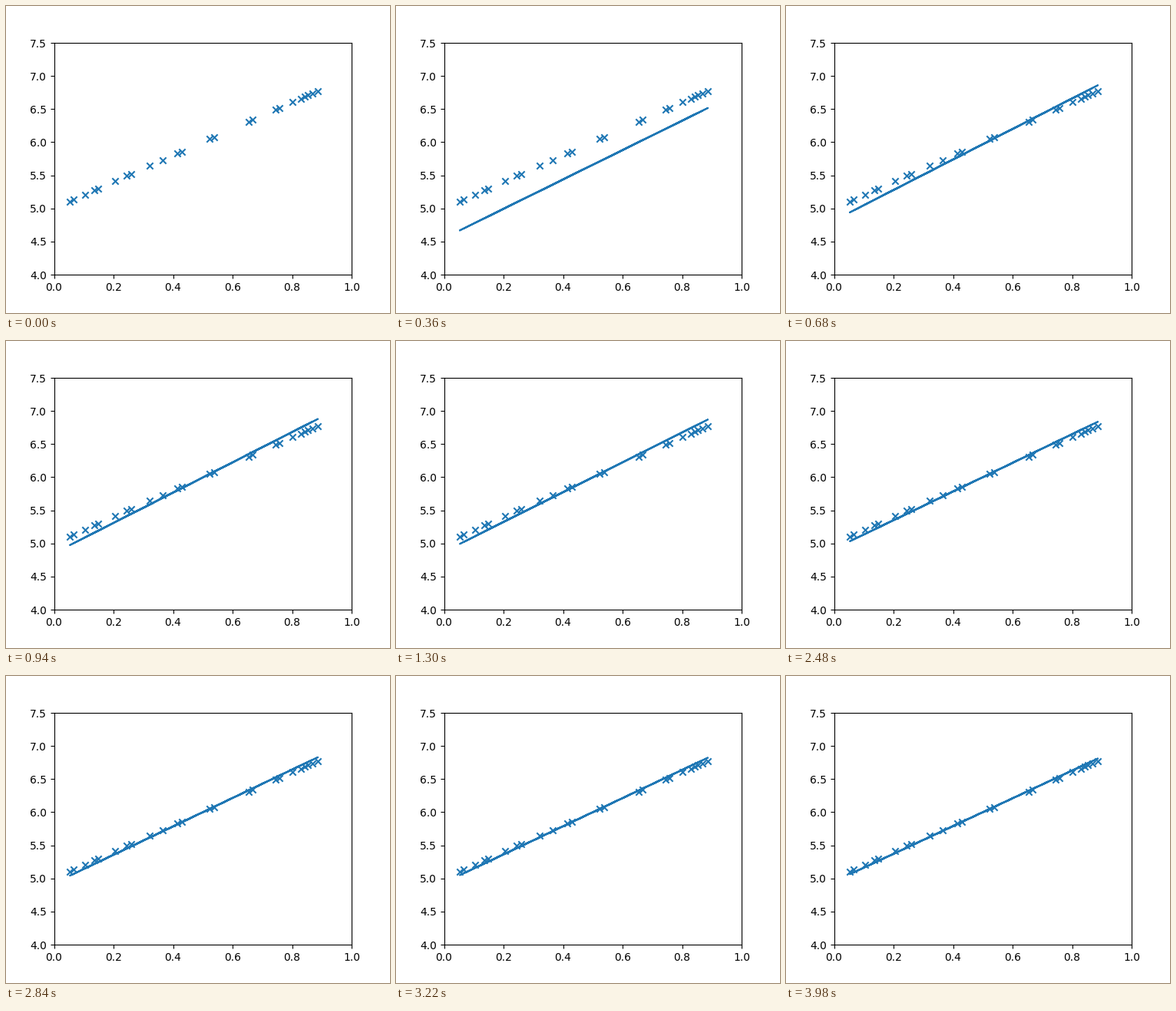
These frames come from a looping animation (500x400 px, 4 s). A matplotlib script:

```python
import numpy as np
import matplotlib.pyplot as plt
from matplotlib.animation import FuncAnimation

FRAMES, INTERVAL = 200, 20
SLOPE, OFFSET = 2, 5
RATE = 0.1134
MEAN_X, MEAN_XX = 0.47, 0.299  # moments that shape the descent

# Samples cluster as lone points and as close pairs
lone = np.array([0.1045, 0.205, 0.32, 0.365, 0.802, 0.887])
pairs = np.array([0.06, 0.142, 0.252, 0.422, 0.53, 0.661, 0.751, 0.836, 0.861])
x = np.concatenate([lone, pairs - 0.007, pairs + 0.007])
# Unsorted samples: the fitted line retraces itself
np.random.default_rng(3).shuffle(x)


def descend(steps):
    """Weight and bias after each step of gradient descent from zero."""
    w = b = 0.0
    path = []
    for _ in range(steps):
        dw, db = w - SLOPE, b - OFFSET
        w -= RATE * (MEAN_XX * dw + MEAN_X * db)
        b -= RATE * (MEAN_X * dw + db)
        path.append((w, b))
    return path


fits = descend(FRAMES)

fig, ax = plt.subplots(figsize=(5, 4), dpi=100)
fig.subplots_adjust(left=0.125, right=0.9, bottom=0.125, top=0.88)
ax.set_xlim(0, 1)
ax.set_ylim(4, 7.5)
ax.scatter(x, SLOPE * x + OFFSET, marker="x", color="tab:blue")
line, = ax.plot([], [], color="tab:blue")


def update(i):
    w, b = fits[i]
    line.set_data(x, w * x + b)
    return line,


anim = FuncAnimation(fig, update, frames=FRAMES, interval=INTERVAL, repeat=True)
plt.show()
```
